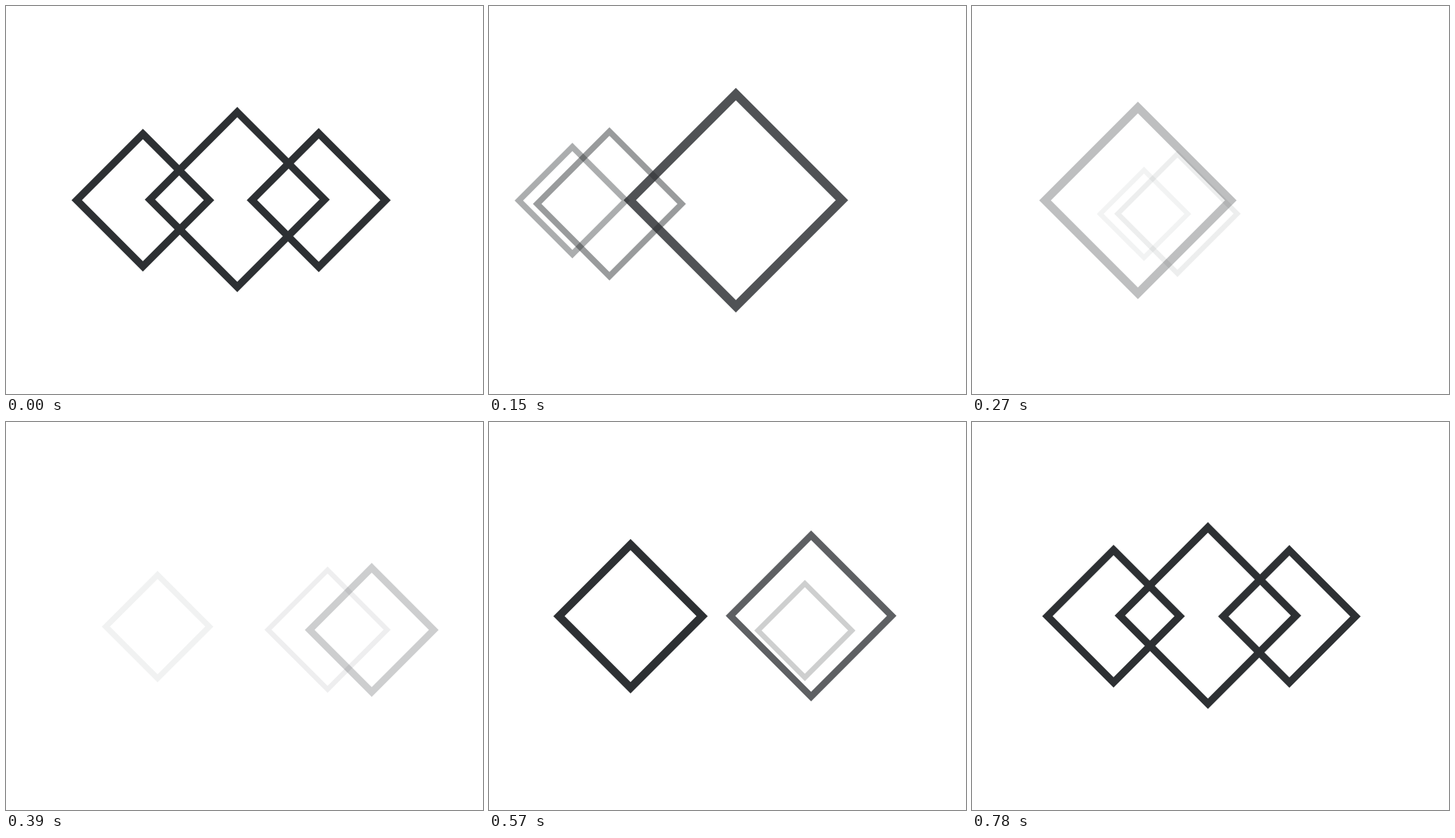
An HTML page with a canvas that plays this animation: 615x500 px, repeating every 1.05 s.

```html
<!DOCTYPE html>
<html lang="en">
<head>
<meta charset="utf-8">
<title>Orbiting diamonds</title>
<style>
  html, body { margin: 0; width: 100%; height: 100%; overflow: hidden; background: #fff; }
  canvas { display: block; }
</style>
</head>
<body>
<canvas id="stage" width="615" height="500"></canvas>
<script>
const ctx = document.getElementById('stage').getContext('2d');
const LOOP = 1050, STEP = 30, REST = 780;
const BORDER = 13.4, SINK = 18.5, NUDGE = 6;

// Each diamond swings left, passes behind to the right, then returns home.
// Swing points are { t, x }; near and far are the closest and most distant moments.
const diamonds = [
  {
    home: 182.5, y: 250.2, size: 92, lag: 1.25, end: 560,
    west: { t: 150, x: 107.5 }, east: { t: 415, x: 484 },
    near: { at: 505, span: 80, amount: .14 },
    far: { at: 250, span: 120, amount: .34 },
    fade: { at: 285, span: 180 }, sink: { at: 330, span: 130 }
  },
  {
    home: 304.2, y: 249.4, size: 120.3, lag: 1, end: 730,
    west: { t: 120, x: 150 }, east: { t: 480, x: 460 },
    near: { at: 0, span: 1, amount: 0 },
    far: { at: 332, span: 215, amount: .33 },
    fade: { at: 332, span: 220 }, sink: { at: 330, span: 172 }
  },
  {
    home: 409.2, y: 250.2, size: 92, lag: 1.25, end: 780,
    west: { t: 345, x: 190 }, east: { t: 670, x: 500 },
    near: { at: 185, span: 115, amount: .59 },
    far: { at: 500, span: 153, amount: .32 },
    fade: { at: 430, span: 242 }, sink: { at: 525, span: 180 }
  }
];

// Smooth bump: 1 at its centre, falling to 0 on both sides
const bump = (t, { at, span }, power = 3) =>
  Math.exp(-Math.pow(Math.abs(t - at) / span, power));

function swing(t, from, to, lag = 1) {
  const u = Math.min(1, (t - from.t) / (to.t - from.t));
  return from.x + (to.x - from.x) * (1 - Math.cos(Math.PI * Math.pow(u, lag))) / 2;
}

function position(d, t) {
  if (t < d.west.t) return swing(t, { t: 0, x: d.home - NUDGE }, d.west);
  if (t < d.east.t) return swing(t, d.west, d.east, d.lag);
  return swing(t, d.east, { t: d.end, x: d.home });
}

function drawDiamond(d, t) {
  const near = bump(t, d.near), far = d.far.amount * bump(t, d.far);
  const radius = d.size * (1 + d.near.amount * near - far);
  const border = BORDER * (1 + Math.min(.2, d.near.amount) * near - far);
  const x = position(d, t);
  const y = d.y + SINK * bump(t, d.sink, 4);
  const r = radius - border / 2;

  ctx.globalAlpha = Math.min(1, 1.04 - .98 * bump(t, d.fade));
  ctx.lineWidth = border / Math.SQRT2;
  ctx.beginPath();
  ctx.moveTo(x, y - r);
  ctx.lineTo(x + r, y);
  ctx.lineTo(x, y + r);
  ctx.lineTo(x - r, y);
  ctx.closePath();
  ctx.stroke();
}

function draw(now) {
  const t = Math.min(REST, Math.floor(now % LOOP / STEP) * STEP);
  ctx.globalAlpha = 1;
  ctx.fillStyle = '#fff';
  ctx.fillRect(0, 0, 615, 500);
  ctx.strokeStyle = '#2d3033';
  for (const d of diamonds) drawDiamond(d, t);
}

const start = performance.now();
function tick() {
  draw(performance.now() - start);
  requestAnimationFrame(tick);
}
tick();
</script>
</body>
</html>
```
